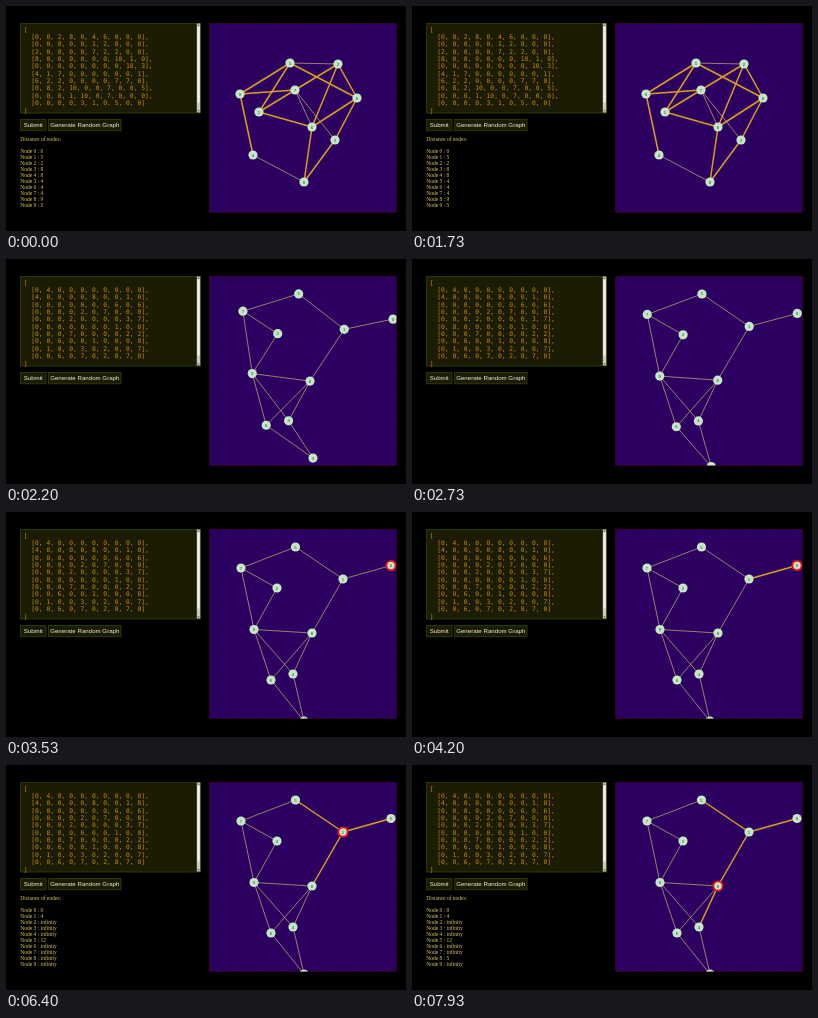
Animation, 400 px wide and 225 px high, one loop 8 s. Source, as an HTML page:

```html
<!DOCTYPE html>
<html lang="en">
<head>
<meta charset="utf-8">
<title>Shortest paths</title>
<style>
html, body { margin: 0; height: 100%; overflow: hidden; background: #000; }
svg { display: block; width: 100%; height: 100%; }
text { white-space: pre; }
.code { font: 6.3px "DejaVu Sans Mono", monospace; fill: #c98c0c; }
.list { font: 5.5px "Liberation Serif", serif; fill: #dcc860; }
.btn { font: 6.15px "Liberation Sans", sans-serif; fill: #f2f0d8; text-anchor: middle; }
.box { fill: #1c1c04; stroke: #304404; stroke-width: .8; }
.label { font: 4.2px "Liberation Sans", sans-serif; fill: #24442c; text-anchor: middle; }
.thin { stroke: #bda972; stroke-width: .75; }
.thick { stroke: #d8a020; stroke-width: 1.5; }
.node { fill: #c6e6c6; }
.active { stroke: #f01010; stroke-width: 1.8; }
</style>
</head>
<body>
<svg viewBox="0 0 400 225">
  <defs><clipPath id="panel"><rect x="203" y="17" width="187.5" height="189.5"/></clipPath></defs>
  <rect width="400" height="225"/>
  <rect class="box" x="14.4" y="17.4" width="180" height="89.6"/>
  <rect x="190.8" y="17.5" width="3.4" height="89" fill="#c9cdb8"/>
  <rect x="191.4" y="20.5" width="2.2" height="76" fill="#f0f2e6"/>
  <path d="M191.3 19.7l1.2-1.4 1.2 1.4zM191.3 104.3l1.2 1.4 1.2-1.4z" fill="#556040"/>
  <g id="code"></g>
  <rect class="box" x="14.4" y="113.4" width="25.6" height="11.4"/>
  <rect class="box" x="42.6" y="113.4" width="72.4" height="11.4"/>
  <text class="btn" x="27.2" y="121.3">Submit</text>
  <text class="btn" x="78.8" y="121.3">Generate Random Graph</text>
  <g id="list"></g>
  <rect x="203.4" y="17.4" width="187" height="189" fill="#2c0060" stroke="#540030" stroke-width=".8" stroke-dasharray="2 1"/>
  <g id="graph" clip-path="url(#panel)"></g>
</svg>
<script>
const LOOP = 8000, SWAP = 1800, SEARCH = 3530, STEP = 460;

// links[a] maps each later neighbour b to the weight of a-b.
const first = makeGraph(
  [{2:2, 3:8, 5:4, 6:6}, {5:1, 6:2, 7:8}, {5:7, 6:2, 7:2}, {7:10, 8:1}, {8:10, 9:3}, {9:1}, {7:7, 8:7}, {9:5}],
  [[351,92], [253,106], [332,58], [329,134], [247,149], [284,57], [306,121], [289,84], [298,176], [234,88]]);
const second = makeGraph(
  [{1:4}, {5:8, 8:1}, {7:6, 9:6}, {4:2, 6:7}, {8:3, 9:7}, {7:1}, {8:2, 9:2}, {9:8}, {9:7}],
  [[385,53.5], [337,67], [271,76], [298,209], [287,162], [289.5,35], [265,168], [235,56], [306,121], [248,117.5]]);

function makeGraph(links, nodes) {
  const m = nodes.map(() => nodes.map(() => 0));
  links.forEach((row, a) => { for (const b in row) m[a][b] = m[b][a] = row[b]; });
  return { m, nodes, events: search(m) };
}

// Shortest-path search from node 0, recorded as one event per step.
function search(m) {
  const dist = m.map((_, i) => i ? Infinity : 0), open = new Set(m.keys()), events = [];
  while (open.size) {
    const u = [...open].reduce((p, q) => dist[q] <= dist[p] ? q : p);
    open.delete(u);
    events.push({ visit: u });
    m[u].forEach((w, v) => {
      if (!w || !open.has(v) || dist[u] + w >= dist[v]) return;
      dist[v] = dist[u] + w;
      events.push({ edge: edgeKey(u, v) }, { node: v, value: dist[v] });
    });
  }
  return events;
}

function edgeKey(a, b) { return Math.min(a, b) + "-" + Math.max(a, b); }

// State of the search after the first n events.
function progress({ m, events }, n) {
  const s = { active: -1, thick: new Set(), dist: m.map((_, i) => i ? "infinity" : 0), listed: false };
  for (const e of events.slice(0, n)) {
    if ("visit" in e) s.active = e.visit;
    else if (e.edge) s.thick.add(e.edge);
    else { s.dist[e.node] = e.value; s.listed = true; }
  }
  if (n >= events.length) s.active = -1;
  return s;
}

// The new layout turns into its rest position while the lowest node drops.
function settle(nodes, t) {
  const k = t > SEARCH ? 0 : Math.min(1.9, Math.exp((2200 - t) / 270));
  return nodes.map(([x, y]) => y > 200
    ? [x + 9 * k, y - 10 * k]
    : [x - .06 * (y - 88) * k, y + .07 * (x - 290) * k]);
}

const lines = (rows, cls, x, y, step) =>
  rows.map((s, i) => `<text class="${cls}" x="${x}" y="${y + i * step}">${s}</text>`).join("");

function codeHtml(m) {
  const rows = m.map(r => `  [${r.join(", ")}]`).join(",\n").split("\n");
  return lines(["[", ...rows, "]"], "code", 17.7, 25.6, 7.36);
}

function listHtml(dist) {
  return lines(["Distance of nodes:"], "list", 14.3, 135.2, 0) +
    lines(dist.map((d, i) => `Node ${i} : ${d}`), "list", 14.3, 147.4, 5.95);
}

function graphHtml(m, nodes, { thick, active }) {
  let html = "";
  m.forEach((row, a) => row.forEach((w, b) => {
    if (w && a < b) html += `<path class="${thick.has(edgeKey(a, b)) ? "thick" : "thin"}" d="M${nodes[a]}L${nodes[b]}"/>`;
  }));
  nodes.forEach(([x, y], i) => {
    html += `<circle class="node ${i === active ? "active" : ""}" cx="${x}" cy="${y}" r="4.6"/>` +
      `<text class="label" x="${x}" y="${y + 1.5}">${i}</text>`;
  });
  return html;
}

const shown = {};
function put(id, html) {
  if (shown[id] !== html) document.getElementById(id).innerHTML = shown[id] = html;
}

function draw(t) {
  const g = t < SWAP ? first : second;
  const done = g === first ? g.events.length : Math.max(0, Math.floor((t - SEARCH) / STEP) + 1);
  const state = progress(g, done);
  put("code", codeHtml(g.m));
  put("list", state.listed ? listHtml(state.dist) : "");
  put("graph", graphHtml(g.m, g === first ? g.nodes : settle(g.nodes, t), state));
}

const start = performance.now();
function tick() {
  draw((performance.now() - start) % LOOP);
  requestAnimationFrame(tick);
}
tick();
</script>
</body>
</html>
```
